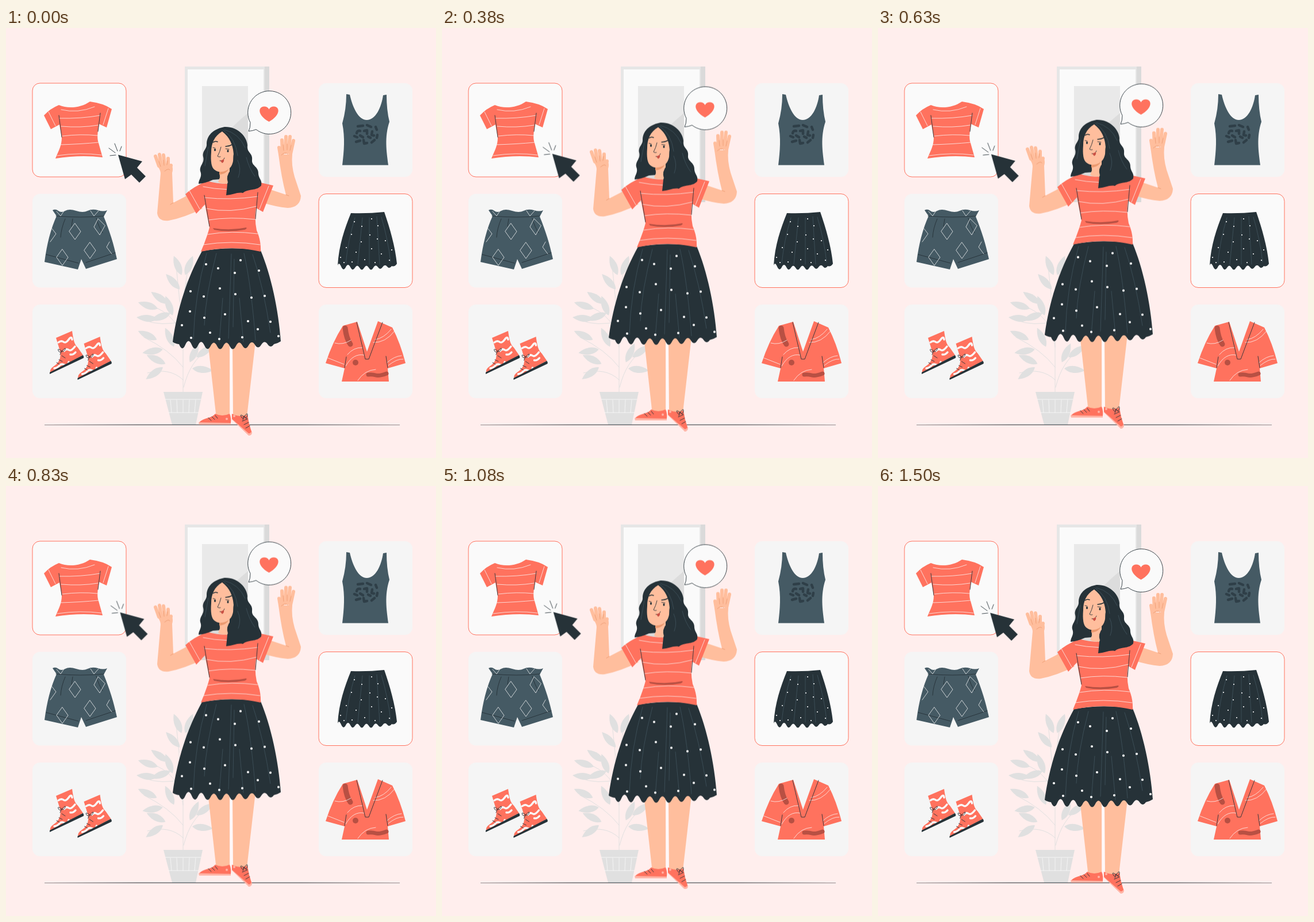
Recreate the animation shown at these times as an HTML page without scripts. Size 748 by 748 pixels, loop 1540 ms.

```html
<!DOCTYPE html>
<html lang="en">
<head>
<meta charset="utf-8">
<title>Choosing an outfit</title>
<style>
html, body { margin: 0; width: 100%; height: 100%; overflow: hidden; background: #ffeeed; }
svg { display: block; width: 100vw; height: 100vh; }
.coral { fill: #ff725e; }
.dark { fill: #263238; }
.slate { fill: #455a64; }
.skin { fill: #ffbe9d; }
.line { fill: none; stroke-linecap: round; stroke-linejoin: round; }
.white { stroke: #fafafa; stroke-width: .75; }
.ink { stroke: #263238; stroke-width: .9; }
.brow { stroke: #263238; stroke-width: 1.5; }
.fold { stroke: #455a64; stroke-width: .7; }
.shade { stroke: #b85043; }
.crease { stroke: #eb996f; stroke-width: .8; }
.finger { stroke: #ffbe9d; stroke-width: 6; }
.dots { stroke: #fafafa; stroke-width: 4.2; }
.small { stroke-width: 2.2; }
.picked { fill: #fafafa; stroke: #ff725e; stroke-width: 1; }
.woman { animation: bob 1540ms linear infinite; }
.cursor { animation: nudge 1540ms linear infinite; }
@keyframes bob {
  0%, 96%, 100% { transform: translateY(0); }
  47.4% { transform: translateY(-14.3px); }
}
@keyframes nudge {
  0% { transform: translate(0, 0); }
  17.2% { transform: translate(-5.6px, -2px); }
  50% { transform: translate(4.6px, -.5px); }
  78.2% { transform: translate(-3.7px, -1.6px); }
  100% { transform: translate(.6px, .3px); }
}
</style>
</head>
<body>
<svg viewBox="0 0 748 748">
<defs>
  <rect id="card" width="163" height="163" rx="13"/>
  <path id="leaf" d="M0 17C-8 8-8-6 0-19C8-6 8 8 0 17Z"/>
  <path id="diamond" d="M0-14L10 0L0 14L-10 0Z"/>
  <g id="boot">
    <path class="coral" d="M87 539L115 527C117 540 118 550 125 556L134 569L77 600C76 594 79 591 85 587C93 581 96 573 94 562Z"/>
    <path class="line" stroke="#fafafa" stroke-width="3.4" d="M91 547q5-4 9-1t9-4 6 0M101 562q4-5 8-2t11-6M84 592q6-1 9-5t9-1 7-5M112 568q5 1 9-4"/>
    <path class="dark" d="M76 599L134 569Q136 572 135 574L76 602Z"/>
    <path class="line ink" d="M97 570l6 4M92 577l6 3M88 582l5 3M97 562q-8-6-6-1t6 1q8-8 6-3t-6 3l-3 6"/>
  </g>
</defs>
<rect width="748" height="748" fill="#ffeeed"/>

<!-- picture on the wall -->
<path fill="#e6e6e6" d="M311 67H458V303H311Z"/>
<path fill="#dadada" d="M450 67h8v236h-8z"/>
<path fill="#fafafa" d="M316 72H448V303H316Z"/>
<path fill="#e9e9e9" d="M341 101H421V303H341Z"/>
<path fill="#dcdcdc" d="M341 240Q375 185 421 148V303H341Z"/>

<!-- plant -->
<g fill="#e0e0e0">
  <path class="line" stroke="#e0e0e0" d="M308 634V500Q309 455 318 412M308 555Q304 500 250 482M308 540Q300 450 296 415M308 590Q285 560 240 538M308 612Q285 590 246 600M309 625Q320 580 350 560M308 510Q270 520 240 508"/>
  <use href="#leaf" transform="translate(299 414) rotate(-22)"/>
  <use href="#leaf" transform="translate(318 414) rotate(22)"/>
  <use href="#leaf" transform="translate(291 442) rotate(-42)"/>
  <use href="#leaf" transform="translate(323 440) rotate(42)"/>
  <use href="#leaf" transform="translate(268 470) rotate(-55)"/>
  <use href="#leaf" transform="translate(284 484) rotate(-20)"/>
  <use href="#leaf" transform="translate(248 483) rotate(-72)"/>
  <use href="#leaf" transform="translate(246 505) rotate(-85)"/>
  <use href="#leaf" transform="translate(270 502) rotate(-110)"/>
  <use href="#leaf" transform="translate(247 535) rotate(-65)"/>
  <use href="#leaf" transform="translate(285 539) rotate(-25)"/>
  <use href="#leaf" transform="translate(256 562) rotate(-100)"/>
  <use href="#leaf" transform="translate(262 577) rotate(-65)"/>
  <use href="#leaf" transform="translate(259 600) rotate(-125)"/>
  <use href="#leaf" transform="translate(327 566) rotate(25)"/>
  <use href="#leaf" transform="translate(345 563) rotate(55)"/>
  <use href="#leaf" transform="translate(341 594) rotate(96)"/>
  <path d="M274 633H342L330 690H289Z"/>
  <path class="line white" d="M277 646H339M282 669H335M286 647l2 22M297 647l1 22M308 647v22M319 647l-1 22M330 647l-2 22"/>
</g>
<path class="dark" d="M67 690L230 689.7H430L685 690V690.6L430 690.8H230L67 690.6Z"/>

<!-- cards -->
<g fill="#f5f5f5">
  <use href="#card" class="picked" x="46" y="96"/>
  <use href="#card" x="46" y="288.5"/>
  <use href="#card" x="46" y="481"/>
  <use href="#card" x="544" y="96"/>
  <use href="#card" class="picked" x="544" y="288.5"/>
  <use href="#card" x="544" y="481"/>
</g>

<g><!-- t-shirt -->
  <path class="coral" d="M92 134C108 141 130 139 146 128Q170 131 184 141L175 173L162 167Q157 190 161 200L168 225Q130 220 86 227C92 212 97 205 97 190L93 168L78 176L66 152Q77 140 92 134Z"/>
  <path class="line white" d="M96 142Q125 149 154 137M93 157Q130 158 164 152M96 171Q130 174 160 169M98 188Q130 184 159 187M95 203Q130 202 161 199M89 222Q130 216 166 221M74 146L86 170M178 140L169 168"/>
  <path class="line ink" d="M92 152L97 190M164 148L160 180"/>
</g>
<g><!-- shorts -->
  <path class="slate" d="M81 317Q86 314 91 318T103 318T122 318T142 318T160 317T176 317L170 328C181 355 187 375 193 402L139 419L131 402L125 420L67 407Q73 360 88 327Z"/>
  <path class="line ink" d="M87 327Q130 331 170 327M70 394L126 409M139 408L190 391M103 332Q96 348 95 364M116 332l-2 13M157 331q5 17 11 25"/>
  <g class="line white">
    <use href="#diamond" x="120" y="354"/>
    <use href="#diamond" x="146" y="387"/>
    <use href="#diamond" x="98" y="399"/>
    <path d="M160 332l-7 14 10 14 9-16zM80 349l7 9-10 14M180 372l-5 9 9 12M88 319l7 8 6-9M147 318l6 9 8-9"/>
  </g>
</g>
<use href="#boot"/>
<use href="#boot" x="48.500" y="10"/>

<g><!-- tank top -->
  <path class="slate" d="M592 115L598 116C603 138 613 160 627.500 160C643 160 653 138 656 117L662 116Q662 143 667 163C658 190 662 215 665 238.500H585C588 214 590 191 585 166Q592 141 592 115Z"/>
  <path class="line" stroke="#2f3f48" stroke-width="4.500" d="M612 171l9-1M628 169l7 3M643 172l2 5M610 183q1-5 6-4M623 179l5-1v6M637 180l-1 6 4 1M606 188l5 2M616 187l5 3M630 189l4 2M646 186l-1 5M609 198l7-2M622 195l1 6 5-1M636 199l5-4"/>
</g>
<g><!-- small skirt -->
  <path class="dark" d="M600 322Q630 323 658 320C668 349 677 380 680 410Q676 416 671 414q-4 6-8 1t-8 1-8 0-8 1-8 0-8 0-8 0-8 0-8-1-8 0-8-1-6-2C579 378 589 349 600 322Z"/>
  <path class="line fold" d="M607 330Q595 370 591 409M620 330L612 411M632 330V411M645 328L650 411M653 329Q665 370 669 407"/>
  <path class="line dots small" d="M606 337h0M636 332h0M619 345h0M647 344h0M601 359h0M633 360h0M618 372h0M660 370h0M646 367h0M592 382h0M609 390h0M636 384h0M653 393h0M671 386h0M582 399h0M624 403h0M602 407h0M642 408h0M667 404h0M588 408h0"/>
</g>
<g><!-- blouse -->
  <path class="coral" d="M586 518L611 511L628 563L647 510L672 521Q686 548 695 583L664 592L666 615H584L589 592L556 583Q568 546 586 518Z"/>
  <path class="line shade" stroke-width="9" d="M590 522Q592 540 599 550"/>
  <path class="line shade" stroke-width="7" d="M630 603Q637 602 643 604T662 601"/>
  <circle fill="#b85043" cx="608" cy="582" r="5"/>
  <path class="line white" d="M560 574L588 585M594 568Q605 555 620 556M591 588Q604 565 623 569M572 548Q586 552 600 543M639 547Q660 548 676 527M642 542Q657 540 670 524M663 582Q675 571 688 570M665 587Q680 575 691 576M612 613Q624 595 643 594"/>
  <path class="line ink" d="M610 512L625 576H631L655 512M589 591L592 572M664 591L661 571"/>
</g>

<g class="woman">
  <!-- legs and shoes -->
  <path class="skin" d="M351 545H389V675H365.500ZM394 545H434L419 676H395Z"/>
  <path fill="#fff" opacity=".6" d="M389.500 550h4l1 122h-4z"/>
  <path fill="#ffb4a6" d="M335 686H391V690H336ZM392 680L422 709Q428 709 428 703L420 690Z"/>
  <path class="coral" d="M336 686C344 677 357 680 364 671Q376 677 389 671Q392 678 391 687Z"/>
  <path class="coral" d="M393 671Q406 678 420 673Q422 688 427 702Q425 706 422 705L393 680Z"/>
  <circle fill="#ffb4a6" cx="384" cy="680" r="2"/>
  <circle fill="#ffb4a6" cx="397" cy="675" r="2"/>
  <path class="line ink" d="M352 678l5 5M358 676l5 5M364 674l4 5M411 684l9-4M414 690l8-4M417 696l7-4M414 676q-8-6-5 0t5 0q7-9 6-2t-6 2l-2 6M414 676l5 4"/>

  <!-- skirt -->
  <path class="dark" d="M341 388Q390 379 443 387C461 430 474 490 478 545Q472 549 466 550q-5.500 8-11 0t-11 1-11 0-11 1-11 0-11 1-11 0-11 0-11 0-11 0-11-1-11 0-11-1-11 0-11-1Q294 549 290 546C298 488 315 435 341 388Z"/>
  <path class="line fold" d="M349 392Q328 465 326 541M366 392Q347 465 345 517M392 393L387 540M397 402L395 520M414 392Q427 450 434 543M429 394Q448 450 460 530M377 470L371 546M406 470L413 546"/>
  <path class="line dots" d="M408 404h0M369 418h0M348 411h0M398 426h0M440 422h0M321 458h0M372 453h0M344 467h0M399 463h0M427 469h0M450 466h0M320 493h0M381 498h0M345 504h0M421 510h0M460 511h0M306 517h0M438 524h0M355 530h0M322 539h0M371 541h0M411 538h0M474 536h0"/>

  <!-- arms -->
  <path class="skin" d="M318 290L291 304L289 252C291 245 290 240 286 237L262 233C263 241 269 246 269 253L263 322Q265 337 283 335Q310 330 342 314Z"/>
  <path class="line finger" d="M266 240L260 223M270 238L267 220M276 238L274 221M282 240L282 227M285 247L287 239"/>
  <path class="line crease" d="M266 232l3 9M274 230l1 9M281 231l-1 7M276 249q7-6 9-2M291 304l-5 3"/>
  <path class="skin" d="M454 279L487 290Q479 260 474 220H498Q496 238 502 259L513 292Q512 312 490 313Q469 311 447 304Z"/>
  <path class="line finger" d="M477 220L475 208M481 218L480 195M486 216L487 189M491 216L494 189M495 219L500 196"/>
  <path class="line crease" d="M482 203l1 10M489 202v10M496 204l-2 9M479 221q7-7 12-1M487 290l5 2"/>

  <!-- shirt -->
  <path class="coral" d="M350 266Q382 276 430 266L465 274L447 320L435 313Q432 333 436 352Q444 370 443 389Q392 377 339 389Q349 366 354 347L346 307L331 323L312 289Q326 276 350 266Z"/>
  <path class="line white" d="M343 276Q380 284 436 279M345 295Q390 300 438 293M348 314Q390 323 436 310M352 334Q390 328 434 333M351 359Q392 352 438 358M343 377Q392 369 442 377M319 283L337 315M457 275L441 315"/>
  <path class="line ink" d="M345 291L354 345M438 286L434 332"/>
  <path fill="#b85043" d="M360 348Q390 353 418 347Q420 349 415 351Q386 356 362 351Z"/>

  <!-- head -->
  <path class="dark" d="M380 172C402 171 419 188 420 204C418 217 430 217 428 230C427 240 440 241 439 254C440 263 446 264 444 274C436 284 421 279 412 287C403 285 395 290 383 291L386 262L360 264Q347 270 335 271C335 263 342 259 338 249C336 239 346 235 343 224C341 213 350 211 349 201C350 184 364 175 380 172Z"/>
  <path class="skin" d="M371 239H389V265L384 271Q374 271 369 268L372 260Z"/>
  <path fill="#eb996f" d="M371 249Q383 250 389 242Q385 254 371 255Z"/>
  <path class="skin" d="M376 180C362 188 357 201 357 216Q355 240 362 246Q371 254 385 247Q396 241 396 221Q397 196 376 180Z"/>
  <path class="dark" d="M376 179Q398 188 418 200L421 241L386 269Q382 257 391 247C398 236 394 229 396 219Q394 194 376 179Z"/>
  <path class="line fold" d="M380 177Q405 183 416 208M378 178Q399 191 403 222M403 230Q410 245 404 260M418 225Q423 245 433 258M352 207Q349 224 346 240"/>
  <path class="line brow" d="M360 199Q364 196 368 198M382 206Q388 206 393 203"/>
  <ellipse class="dark" cx="363.500" cy="212" rx="1.500" ry="2.200"/>
  <ellipse class="dark" cx="386" cy="214" rx="1.500" ry="2.200"/>
  <path class="line ink" d="M360 208l4 1M382 210l6 1M374 207Q372 216 368 223Q370 225 373 224M372 231Q378 232 380 226"/>
  <path fill="#c94f43" d="M373 231L379 228Q380 233 376 235Z"/>

  <!-- speech bubble -->
  <path fill="#fafafa" stroke="#263238" stroke-width=".9" d="M425 164.500A37.500 37.500 0 1 1 435 176.500Q429 179 422 179.500Q425 174 425 164.500Z"/>
  <path class="coral" d="M457.500 163C436 151 439 136.500 449 136.500Q455 136.500 457.500 141.500Q460 136.500 466 136.500C476 136.500 479 151 457.500 163Z"/>
</g>

<g class="cursor">
  <path class="dark" d="M195 220.500L237 232L228 243L243 258L232 269L218 255L207 263Z"/>
  <path class="line ink" d="M181 222L191 221M179 209L190 217M189 201L194 214M201 206L198 214"/>
</g>
</svg>
</body>
</html>
```
